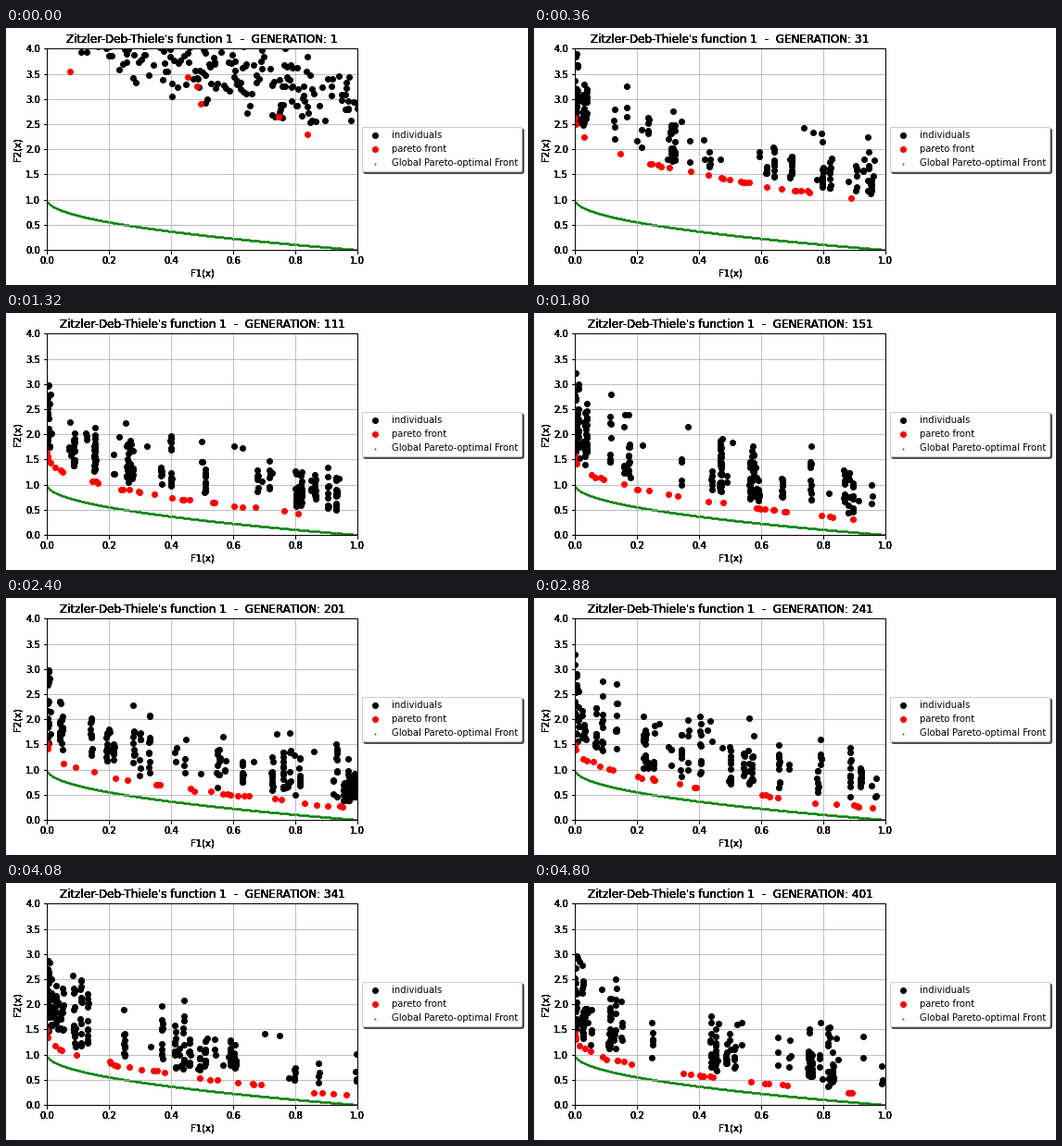
Write a matplotlib script that moves like this. It is 563x278 px and loops after 4.92 s.

```python
import numpy as np
import matplotlib.pyplot as plt
from matplotlib.animation import FuncAnimation

W, H, DPI = 563, 278, 72
FRAMES, INTERVAL, STEP = 41, 120, 10
LAYERS = 7
RECT = [44.1 / W, 38.1 / H, 334.8 / W, 217.44 / H]

START_FRONT = np.array([(.075, 3.55), (.454, 3.44), (.484, 3.26),
                        (.497, 2.9), (.747, 2.65), (.84, 2.3)])


def f2(x, g):
    """Second objective of ZDT1 for a distance factor g."""
    return g - np.sqrt(g * x)


def best_g(gen):
    """Fast early convergence, then a slow steady gain."""
    return 1.52 - .0005 * gen + 2.68 * np.exp(-(gen - 1) / 31)


def first_population(rng):
    x = rng.random(220)
    g = np.maximum(rng.normal(5.3, .5, 220), rng.uniform(4.35, 4.6, 220))
    return np.column_stack([x, f2(x, g)]), START_FRONT


def population(gen):
    rng = np.random.default_rng(gen)
    if gen == 1:
        return first_population(rng)
    best = best_g(gen)

    # Individuals share few x values, so they stand in columns
    cols = rng.beta(.75, .85, 28)
    sizes = rng.integers(2, 14, len(cols))
    x = np.repeat(cols, sizes) + rng.normal(0, .001, sizes.sum())
    low = np.repeat(rng.uniform(.12, .4, len(cols)), sizes)
    spread = np.repeat(rng.uniform(.5, 1.9, len(cols)), sizes)

    # A crowd at the left edge and a few loose points
    x = np.concatenate([x, np.abs(rng.normal(0, .006, 24)), rng.random(10)])
    low = np.concatenate([low, np.full(34, .2)])
    spread = np.concatenate([spread, np.full(34, 1.7)])
    x = np.clip(x, 0, 1)
    g = best + low + spread * rng.beta(1, 1.4, len(x))

    fx = np.sort(np.concatenate([[0, .004], .97 * rng.beta(.7, .9, 25)]))
    fy = f2(fx, best) + .1 * np.exp(-fx / .01) + rng.normal(0, .015, len(fx))
    front_points = np.column_stack([fx, np.minimum.accumulate(fy)])
    return np.column_stack([x, f2(x, g)]), front_points


fig = plt.figure(figsize=(W / DPI, H / DPI), dpi=DPI, facecolor="white")

# Stacked axes give the heavy look of labels and legend shadow
layers = [fig.add_axes(RECT, label=f"layer{i}") for i in range(LAYERS)]
ax = layers[0]
ax.grid(True)
individuals, = ax.plot([], [], "o", color="black", label="individuals")
front, = ax.plot([], [], "o", color="red", label="pareto front")
curve_x = np.linspace(0, 1, 600)
curve = ax.scatter(curve_x, 1 - np.sqrt(curve_x), s=1, color="green",
                   label="Global Pareto-optimal Front")

for layer in layers:
    layer.set(xlim=(0, 1), ylim=(0, 4), xlabel="F1(x)", ylabel="F2(x)")
    layer.patch.set_visible(layer is ax)
    layer.legend(handles=[individuals, front, curve], loc="center left",
                 bbox_to_anchor=(1, .5), shadow=True)


def update(i):
    gen = 1 + STEP * i
    points, best = population(gen)
    individuals.set_data(*points.T)
    front.set_data(*best.T)
    for layer in layers:
        layer.set_title(f"Zitzler-Deb-Thiele's function 1  -  GENERATION: {gen}")
    return individuals, front


anim = FuncAnimation(fig, update, frames=FRAMES, interval=INTERVAL,
                     repeat=True, blit=False)
plt.show()
```
